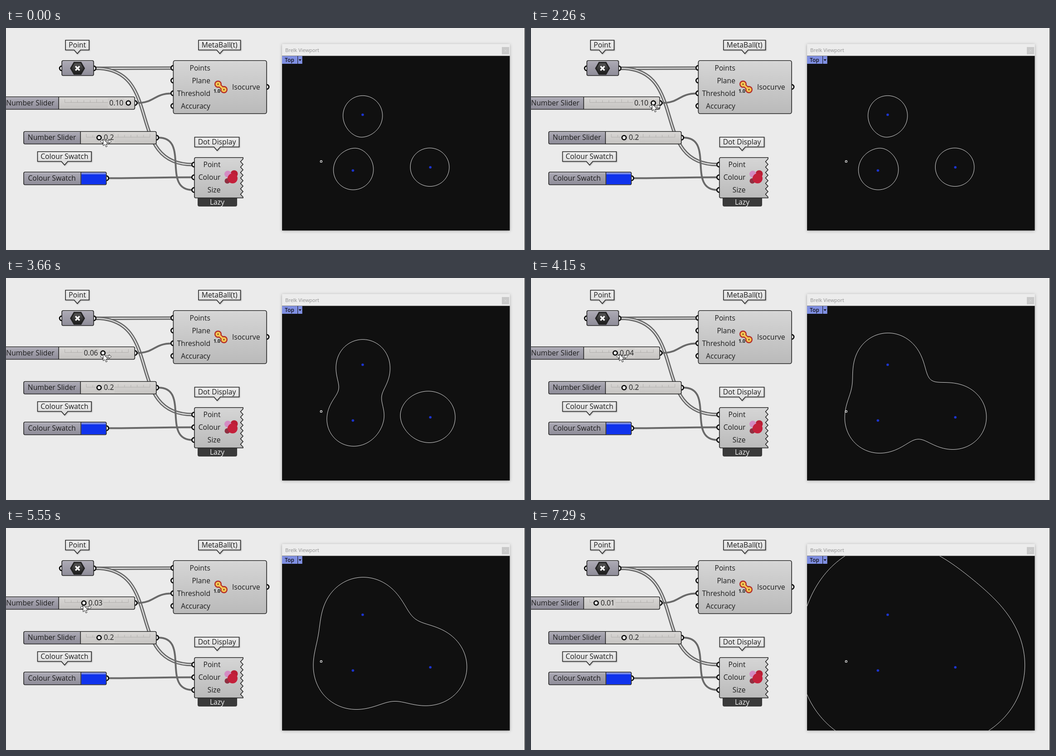
An HTML page that plays this animation: 1143 by 490 pixels, repeating every 7.42 s.

```html
<!DOCTYPE html>
<html lang="en">
<head>
<meta charset="utf-8">
<title>Metaball threshold</title>
<style>
html, body { margin: 0; width: 100%; height: 100%; overflow: hidden; background: #ebebeb; }
svg { display: block; }
text { font: 15.7px "Open Sans", "Noto Sans", sans-serif; fill: #1c1c1c; }
.mid { text-anchor: middle; }
.end { text-anchor: end; }
.edge { stroke: #262626; stroke-width: 1.6; }
.wire { fill: none; stroke: #696969; stroke-width: 4; }
.twin { stroke-width: 7.6; }
.gap { fill: none; stroke: #ebebeb; stroke-width: 2.2; }
.ring { fill: #fff; stroke: #0c0c0c; stroke-width: 2.8; }
.track { fill: none; stroke: #b2b0ae; stroke-width: 1; }
</style>
</head>
<body>
<svg id="stage" width="1143" height="490" viewBox="0 0 1143 490"></svg>
<script>
const LOOP = 7420;
const stage = document.getElementById('stage');

// Static drawing helpers
const text = (x, y, s, cls = 'mid', style = '') =>
  `<text x="${x}" y="${y}" class="${cls}" style="${style}">${s}</text>`;
const box = (x, y, w, h, fill, more = '') =>
  `<rect x="${x}" y="${y}" width="${w}" height="${h}" fill="${fill}" ${more}/>`;
const dot = (x, y, r, fill, more = '') =>
  `<circle cx="${x}" cy="${y}" r="${r}" fill="${fill}" ${more}/>`;
const port = (x, y) => `<circle class="ring" cx="${x}" cy="${y}" r="5"/>`;
const path = (d, cls, more = '') => `<path d="${d}" class="${cls}" ${more}/>`;
const gradient = (id, top, bottom) =>
  `<linearGradient id="${id}" x2="0" y2="1"><stop stop-color="${top}"/>` +
  `<stop offset="1" stop-color="${bottom}"/></linearGradient>`;

// The handles reach out half the distance between the ends
function wire(x1, y1, x2, y2, twin) {
  const pull = Math.hypot(x2 - x1, y2 - y1) / 2;
  const d = `M${x1} ${y1}C${x1 + pull} ${y1} ${x2 - pull} ${y2} ${x2} ${y2}`;
  return twin ? path(d, 'wire twin') + path(d, 'gap') : path(d, 'wire');
}

function tag(x, y, w, tip, label) {
  const b = y + 21.5;
  const d = `M${x} ${y}h${w}V${b}H${tip + 7}l-7 8l-7 -8H${x}Z`;
  return path(d, 'edge', 'fill="url(#tag)" filter="url(#lift)"') +
    text(x + w / 2, y + 16, label);
}

function plate(x, y, w, h, split, label, labelX) {
  return box(x, y, w, h, 'url(#pale)', 'rx="3"') +
    box(x, y, split - x, h, 'url(#mauve)', 'rx="3"') +
    path(`M${x + 2} ${y + 1.6}H${x + w - 2}`, '', 'stroke="#fff" stroke-opacity=".45"') +
    path(`M${split} ${y}v${h}`, 'edge') +
    box(x, y, w, h, 'none', 'rx="3" class="edge"') +
    text(labelX, y + 18.5, label);
}

function track(x, y) {
  let d = `M${x} ${y}h140`;
  for (let i = 0; i <= 10; i++) d += `M${x + i * 14} ${y}v${i % 5 ? -5 : -7}`;
  return path(d, 'track');
}

function zigzag() {
  let d = 'M418 286H522V289';
  for (let i = 0; i < 7; i++) d += 'l-5.5 6l5.5 6';
  return d + 'V375H418q-3 0 -3 -3V289q0 -3 3 -3Z';
}

const hexagon = r => Array.from({ length: 6 }, (_, i) => {
  const a = i * Math.PI / 3;
  return `${157.5 + r * Math.cos(a)},${89 + r * Math.sin(a)}`;
}).join(' ');

const wires =
  wire(198, 89, 365, 88.5, true) +
  wire(198, 89, 411, 301.5, true) +
  wire(288, 165.5, 365, 144.5) +
  wire(336, 242, 411, 357.5) +
  wire(226, 331.5, 411, 329.5);

const ports = [
  [123, 89], [193, 89], [283.5, 165.5], [331, 242], [221, 331.5], [574, 130],
  ...[88, 116, 144, 172].map(y => [368.5, y]),
  ...[301.5, 329.5, 357.5].map(y => [414.5, y])
].map(p => port(...p)).join('');

const pointNode = box(123, 72, 70, 33, 'url(#mauve)', 'rx="3" class="edge"') +
  path('M126 73.6H190', '', 'stroke="#fff" stroke-opacity=".45"') +
  `<polygon points="${hexagon(16.5)}" fill="#222"/>` +
  `<polygon points="${hexagon(13)}" fill="url(#dark)"/>` +
  path('M153 84.5l9 9M162 84.5l-9 9', '', 'stroke="#fff" stroke-width="3.4"');

const link = (color, r, width) =>
  path('M467 124L480 136', '', `stroke="${color}" stroke-width="${width}"`) +
  dot(467, 124, r, color) + dot(480, 136, r, color);

const ballNode = box(368.5, 72, 205.5, 117, 'url(#body)', 'rx="4" class="edge"') +
  path('M371 73.7H571', '', 'stroke="#fff" stroke-opacity=".55"') +
  ['Points', 'Plane', 'Threshold', 'Accuracy']
    .map((s, i) => text(450, 93.5 + i * 28, s, 'end')).join('') +
  text(498, 135.5, 'Isocurve', '') +
  link('#b32a26', 8, 8) + link('#f3c552', 5.6, 4) + link('#6b3218', 1.5, 0) +
  text(457, 142.5, '1.0', '', 'font-size:10.5px;font-weight:700');

const dotNode = path('M422 375H509V390q0 4 -4 4H426q-4 0 -4 -4Z', '', 'fill="#3a3a3a"') +
  path(zigzag(), 'edge', 'fill="url(#body)"') +
  ['Point', 'Colour', 'Size'].map((s, i) => text(472.5, 307 + i * 28, s, 'end')).join('') +
  text(465, 389.5, 'Lazy', 'mid', 'fill:#f4f4f4') +
  dot(502.5, 322, 8, '#b91f36') + dot(488.5, 322.5, 7.5, '#d48bc3') +
  dot(487.5, 337.5, 6, '#8f3042') + dot(499, 332, 11, '#c4203b');

const swatch = plate(39, 318, 182, 28, 165, 'Colour Swatch', 101) +
  box(166, 319, 54, 26, '#1033ec') + box(166, 319, 54, 4, '#7486e6');

const BALLS = [[785.5, 191.5], [764, 314.5], [934.5, 307.5]];
const view = box(608, 35.5, 501.5, 411.5, '#ececec', 'filter="url(#soft)"') +
  text(615, 52.5, 'Brelk Viewport', '', 'font-size:11px;fill:#909090') +
  box(1092, 42, 16, 16, '#c9c9c9') +
  path('M1097.5 47.5l5 5m0 -5l-5 5', '', 'stroke="#dadada"') +
  box(608, 61.5, 501.5, 385.5, '#101010') +
  '<svg x="608" y="62" width="501.5" height="385" viewBox="608 62 501.5 385">' +
  '<path id="iso" fill="none" stroke="#f2f2f2" stroke-width=".9"/></svg>' +
  BALLS.map(p => dot(...p, 2.8, '#1c34cc')).join('') +
  box(692.2, 292.7, 3.8, 3.8, 'none', 'rx="1" stroke="#fff" stroke-width="1.2"') +
  box(608, 62, 34, 17, '#7f8fe2') + box(643, 62, 9.5, 17, '#7f8fe2') +
  path('M644.5 69h6l-3 4Z', '', 'fill="#15151f"') +
  text(614, 75, 'Top', '', 'font-size:12px;font-weight:600;fill:#15151f');

stage.innerHTML = '<defs>' +
  gradient('body', '#d6d6d6', '#bababa') + gradient('pale', '#d9d7d5', '#c5c3c1') +
  gradient('mauve', '#adabb6', '#8e8c98') + gradient('tag', '#eeeeee', '#dadada') +
  gradient('dark', '#555', '#1d1d1d') +
  '<filter id="soft" x="-5%" y="-5%" width="110%" height="110%">' +
  '<feDropShadow dx="0" dy="1" stdDeviation="3" flood-opacity=".3"/></filter>' +
  '<filter id="lift"><feDropShadow dx="1" dy="1" stdDeviation="1" flood-opacity=".3"/>' +
  '</filter></defs>' +
  box(0, 0, 1143, 490, '#ebebeb') + box(1142, 0, 1, 490, '#2c2c2c') +
  wires + ports +
  tag(131, 27, 52, 157, 'Point') + tag(424, 27, 92.5, 471, 'MetaBall(t)') +
  tag(415.5, 241, 98, 465, 'Dot Display') + tag(69.5, 273, 118.5, 129, 'Colour Swatch') +
  pointNode + ballNode + dotNode + swatch +
  plate(-10, 152, 293.5, 27.5, 116, 'Number Slider', 53.5) + track(129.5, 164.5) +
  plate(39, 228.5, 292, 27.5, 164, 'Number Slider', 101) + track(177, 241) +
  box(211, 231, 28, 22, '#cfcdcb') + text(215.5, 247, '0.2', '') +
  '<circle class="ring" cx="205" cy="242" r="4.6"/>' +
  '<g id="knob">' + box(0, 155, 36, 21, '#cfcdcb', 'id="mask"') +
  '<text id="value" y="170.5"></text><circle id="ring" class="ring" cy="165.5" r="4.6"/></g>' +
  view +
  '<g id="cursor" fill="#fff" stroke="#222" stroke-linejoin="round">' +
  '<path id="resize" d="M-6 5.5l5 -4.5v3h14v-3l5 4.5l-5 4.5v-3h-14v3Z"/>' +
  '<path d="M0 0V15l3.6 -3.2l2.6 5.8l2.6 -1.2l-2.6 -5.4h5Z"/></g>';

// Isocurve of the summed inverse-square field, by marching squares
const STEP = 4;
const inverse = (x, y) =>
  1 / BALLS.reduce((sum, [bx, by]) => sum + 1 / ((x - bx) ** 2 + (y - by) ** 2 + 1e-6), 0);

function isocurve(level) {
  const goal = 1 / (6.18e-5 * level);
  let d = '';
  for (let y = 60; y < 448; y += STEP) {
    for (let x = 606; x < 1112; x += STEP) {
      const c = [[x, y], [x + STEP, y], [x + STEP, y + STEP], [x, y + STEP]];
      const f = c.map(p => inverse(...p) - goal);
      const hits = [];
      for (let i = 0; i < 4; i++) {
        const j = (i + 1) % 4;
        if (f[i] < 0 === f[j] < 0) continue;
        const k = f[i] / (f[i] - f[j]);
        hits.push([0, 1].map(n => (c[i][n] + k * (c[j][n] - c[i][n])).toFixed(2)));
      }
      for (let i = 0; i + 1 < hits.length; i += 2) d += `M${hits[i]}L${hits[i + 1]}`;
    }
  }
  return d;
}

// Pointer path: time, x, y
const PATH = [
  [0, 214, 245], [70, 214, 245], [690, 237, 158], [760, 240, 161], [1180, 274, 167],
  [1450, 275, 168], [1650, 275, 168], [1650, 265, 163], [1850, 265, 163],
  [1850, 275, 168], [2050, 275, 168], [2820, 245, 168], [3660, 214, 168],
  [4290, 189, 168], [4640, 187, 169], [4780, 187, 168], [5900, 162, 171],
  [6250, 162, 171], [6740, 153, 172], [6880, 152, 172], [7080, 152, 173],
  [7220, 205, 256], [LOOP, 205, 256]
];

function pointerAt(t) {
  const i = Math.max(1, PATH.findIndex(p => p[0] > t));
  const [a, b] = [PATH[i - 1], PATH[i]];
  const k = (t - a[0]) / (b[0] - a[0]);
  return [1, 2].map(n => a[n] + (b[n] - a[n]) * k);
}

function levelAt(t) {
  if (t < 2050) return 10;
  const [x] = pointerAt(Math.min(t, 7000));
  return Math.min(10, Math.max(1, Math.round((x - 133.5) / 14)));
}

const el = id => document.getElementById(id);
const parts = Object.fromEntries(
  ['iso', 'mask', 'value', 'ring', 'cursor', 'resize'].map(id => [id, el(id)]));
let shown = 0;

function setLevel(level) {
  if (level === shown) return;
  shown = level;
  const x = 129.5 + level * 14;
  const left = level > 4 ? x - 42 : x + 10;
  parts.ring.setAttribute('cx', x);
  parts.value.setAttribute('x', left);
  parts.mask.setAttribute('x', left - 3);
  parts.value.textContent = (level / 100).toFixed(2);
  parts.iso.setAttribute('d', isocurve(level));
}

let start;
function frame(now) {
  start ??= now;
  const t = (now - start) % LOOP;
  const [x, y] = pointerAt(t);
  setLevel(levelAt(t));
  parts.cursor.setAttribute('transform', `translate(${x.toFixed(1)} ${y.toFixed(1)})`);
  parts.cursor.style.display = t < 7290 ? '' : 'none';
  parts.resize.style.display = t < 140 || (t >= 1180 && t < 7080) ? '' : 'none';
  requestAnimationFrame(frame);
}
requestAnimationFrame(frame);
</script>
</body>
</html>
```
